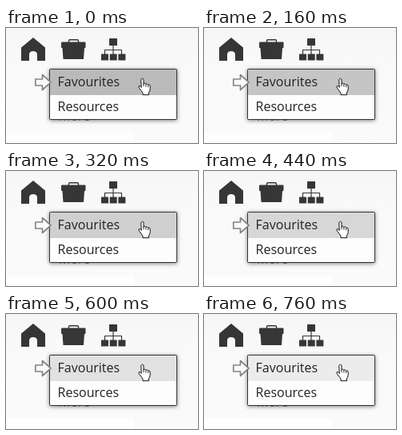
An HTML page with a canvas that plays this animation: 240 px wide and 144 px high, repeating every 800 ms.

```html
<!DOCTYPE html>
<html lang="en">
<head>
<meta charset="utf-8">
<title>Menu hover fade</title>
<style>
  html, body { margin: 0; width: 100%; height: 100%; overflow: hidden; background: #f9f9f9; }
  canvas { display: block; width: 240px; height: 144px; }
</style>
</head>
<body>
<canvas id="stage" width="240" height="144"></canvas>
<script>
const ctx = document.getElementById('stage').getContext('2d');
const LOOP = 800, STEP = 40;
const DARK = '#363636';

function rect(x, y, w, h, color) {
  ctx.fillStyle = color;
  ctx.fillRect(x, y, w, h);
}

function rounded(x, y, w, h, r, color) {
  ctx.fillStyle = color;
  ctx.beginPath();
  ctx.roundRect(x, y, w, h, r);
  ctx.fill();
}

function shape(d, fill, stroke, width = 1) {
  const path = new Path2D(d);
  if (fill) {
    ctx.fillStyle = fill;
    ctx.fill(path);
  }
  if (stroke) {
    ctx.strokeStyle = stroke;
    ctx.lineWidth = width;
    ctx.lineJoin = 'round';
    ctx.lineCap = 'round';
    ctx.stroke(path);
  }
}

function label(text, x, y, color) {
  ctx.font = '16px "Open Sans", sans-serif';
  ctx.fillStyle = color;
  ctx.fillText(text, x, y);
}

function drawPage() {
  const back = ctx.createLinearGradient(0, 0, 0, 144);
  back.addColorStop(0, '#f7f6f7');
  back.addColorStop(0.25, '#f9f9f9');
  back.addColorStop(1, '#fafafa');
  rect(0, 0, 240, 144, back);
  rect(0, 131, 160, 13, '#fefefe');
}

function drawHome() {
  shape('M34 12 L49 24.5 V41 H39 V33.5 Q39 29 34 29 Q29 29 29 33.5 V41 H19 V24.5 Z', DARK);
}

function drawBriefcase() {
  shape('M78.5 18 V16 Q78.5 14.8 79.7 14.8 H89.3 Q90.5 14.8 90.5 16 V18', null, DARK, 1.4);
  rounded(69, 17.5, 30.5, 7.5, 1, DARK);
  shape('M70.5 25 H98 L97 39 H71.5 Z', DARK);
}

function drawSitemap() {
  rounded(129, 13, 10, 9, 0.5, DARK);
  shape('M134 22 V33 M123.5 33 V27.5 H144.5 V33', null, DARK, 1.2);
  for (const x of [119, 129.7, 140.4]) rounded(x, 32.5, 9, 8, 0.5, DARK);
}

function drawArrow() {
  shape('M36.8 64 H45.5 V58.5 L56 68 L45.5 77.5 V72 H36.8 Z', '#fafafa', '#858585', 1.7);
}

function drawMenu(level) {
  label('More', 66, 116, '#777777');
  ctx.save();
  ctx.shadowColor = 'rgba(0,0,0,0.5)';
  ctx.shadowBlur = 5;
  ctx.shadowOffsetY = 1;
  rounded(54, 51, 160, 64, 2, DARK);
  ctx.restore();
  rect(55, 52, 158, 62, '#fdfdfd');
  rect(55, 52, 158, 32, `rgb(${level},${level},${level})`);
  label('Favourites', 64.6, 73, '#222222');
  label('Resources', 64.6, 104, '#222222');
}

function drawHand() {
  ctx.save();
  ctx.translate(-0.5, 0.7);
  shape('M169.5 63.5 Q171 61.5 172.5 63.5 V69 Q174 67.8 175.3 69.5 ' +
        'Q177 68.5 178.2 70.3 Q180.5 69.6 180.7 72 V76 Q180.5 78.5 179 80 V83 H171.5 V80.5 ' +
        'L167 74.5 Q165.5 72 167.5 71.5 L169.5 73.5 Z', '#ffffff', '#111111');
  shape('M172.5 69 V72 M175.4 70 V72.5 M178.2 71 V73', null, '#111111', 0.9);
  ctx.restore();
}

function draw(now) {
  const time = Math.floor((now % LOOP) / STEP) * STEP;
  const level = Math.round(186 + 50 * time / (LOOP - STEP));
  drawPage();
  drawHome();
  drawBriefcase();
  drawSitemap();
  drawMenu(level);
  drawArrow();
  drawHand();
}

const start = performance.now();
function tick() {
  draw(performance.now() - start);
  requestAnimationFrame(tick);
}
tick();
</script>
</body>
</html>
```
